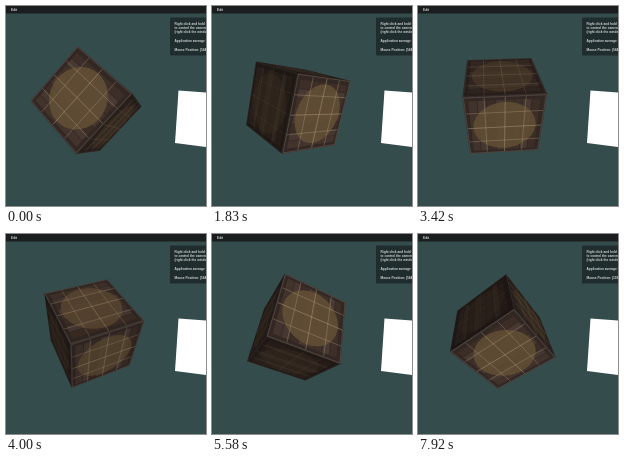
An HTML page with a canvas for the animation above (8 s loop, 200 px wide and 200 px high).

```html
<!DOCTYPE html>
<html lang="en">
<head>
<meta charset="utf-8">
<title>Rotating crate</title>
<style>
  html, body { margin: 0; width: 100%; height: 100%; overflow: hidden; background: #344c4c; }
  svg, canvas { position: absolute; left: 0; top: 0; width: 100vw; height: 100vh; display: block; }
  text { font-family: "Liberation Sans", Arial, sans-serif; font-weight: bold; font-size: 3.2px; fill: #d0d4d4; }
</style>
</head>
<body>
<canvas id="stage"></canvas>
<svg viewBox="0 0 200 200">
  <rect width="200" height="7.5" fill="#1b1e1f"/>
  <text x="5" y="5">Edit</text>
  <rect x="164" y="11.5" width="38" height="38" rx="1" fill="#202d2e"/>
  <text x="168.5" y="19">Right click and hold to</text>
  <text x="168.5" y="22.8">to control the camera</text>
  <text x="168.5" y="26.6">(right click the window</text>
  <text x="168.5" y="35.5">Application average 0.</text>
  <text x="168.5" y="44.5" id="mouse"></text>
  <path d="M172.5 84.5 200 86.5V141L169 137Z" fill="#fff"/>
</svg>
<script>
const LOOP = 8000;
const START_ANGLE = -132, DEGREES_PER_SECOND = 40;
const FOCAL = 211, DISTANCE = 3.18, CENTER = [84, 98];
const PITCH = 35 * Math.PI / 180;
const AXIS = [1 / Math.sqrt(5), 2 / Math.sqrt(5)];

const canvas = document.getElementById('stage');
const ctx = canvas.getContext('2d');
const mouse = document.getElementById('mouse');
const clamp01 = v => Math.min(1, Math.max(0, v));

// Columns of the spin about AXIS, seen by a camera that looks down by PITCH.
function cubeAxes(angle) {
  const c = Math.cos(angle), s = Math.sin(angle), k = 1 - c;
  const [ax, ay] = AXIS;
  const cp = Math.cos(PITCH), sp = Math.sin(PITCH);
  return [
    [c + ax * ax * k, ax * ay * k, -ay * s],
    [ax * ay * k, c + ay * ay * k, ax * s],
    [ay * s, -ax * s, c]
  ].map(([x, y, z]) => [x, cp * y - sp * z, sp * y + cp * z]);
}

function project([x, y, z]) {
  const scale = FOCAL / (DISTANCE - z);
  return [CENTER[0] + x * scale, CENTER[1] - y * scale];
}

function drawFace(normal, right, up) {
  const lit = clamp01((0.25 * normal[0] + 0.97 * normal[2] - 0.38) / 0.42);
  const shade = 0.55 + 0.45 * lit;
  const tone = (r, g, b, a = 1) =>
    `rgba(${[r, g, b].map(v => Math.round(v * shade)).join()},${a})`;
  const at = (u, v) => project(normal.map((n, i) => n / 2 + right[i] * u + up[i] * v));

  const trace = points => {
    ctx.beginPath();
    points.forEach(([u, v]) => ctx.lineTo(...at(u, v)));
  };
  const fill = (points, color) => {
    trace(points);
    ctx.closePath();
    ctx.fillStyle = color;
    ctx.fill();
  };
  const stroke = (points, color, width) => {
    trace(points);
    ctx.strokeStyle = color;
    ctx.lineWidth = width;
    ctx.stroke();
  };
  const box = (u0, v0, u1, v1) => [[u0, v0], [u1, v0], [u1, v1], [u0, v1]];

  fill(box(-0.5, -0.5, 0.5, 0.5), tone(50, 39, 35));
  for (let i = 0; i < 8; i++) {
    const u = -0.44 + i * 0.11;
    const d = 6 * Math.sin(i * 2.4);
    fill(box(u, -0.44, u + 0.1, 0.44), tone(66 + d, 51 + d, 44 + d));
  }

  const disc = Array.from({ length: 40 }, (_, i) => {
    const a = i * Math.PI / 20;
    return [0.41 * Math.cos(a), 0.41 * Math.sin(a)];
  });
  fill(disc, tone(100, 80, 54, 0.25 + 0.6 * lit));

  for (const p of [-0.25, 0, 0.25]) {
    const glow = (p ? 0.4 : 0.55) * (0.25 + 0.75 * lit);
    stroke([[p, -0.48], [p, 0.48]], tone(190, 168, 138, glow), 0.8);
    stroke([[-0.48, p], [0.48, p]], tone(190, 168, 138, glow), 0.8);
  }
  const edge = box(-0.49, -0.49, 0.49, 0.49);
  stroke([...edge, edge[0]], tone(130, 112, 100, 0.2 + 0.3 * lit), 0.8);
}

function drawCube(angle) {
  const axes = cubeAxes(angle);
  for (let i = 0; i < 3; i++) {
    for (const side of [1, -1]) {
      const normal = axes[i].map(v => v * side);
      if (normal[2] * DISTANCE > 0.5) drawFace(normal, axes[(i + 1) % 3], axes[(i + 2) % 3]);
    }
  }
}

function resize() {
  const ratio = window.devicePixelRatio || 1;
  const w = Math.round(innerWidth * ratio), h = Math.round(innerHeight * ratio);
  if (canvas.width !== w || canvas.height !== h) {
    canvas.width = w;
    canvas.height = h;
  }
  ctx.setTransform(w / 200, 0, 0, h / 200, 0, 0);
}

const start = performance.now();
function render() {
  const t = (performance.now() - start) % LOOP;
  resize();
  ctx.lineJoin = 'round';
  ctx.fillStyle = '#344c4c';
  ctx.fillRect(0, 0, 200, 200);
  drawCube((START_ANGLE + DEGREES_PER_SECOND * t / 1000) * Math.PI / 180);

  const moved = clamp01((t - 7100) / 700);
  mouse.textContent = `Mouse Position: (${Math.round(544 + 493 * moved)}.0`;
  requestAnimationFrame(render);
}
render();
</script>
</body>
</html>
```
